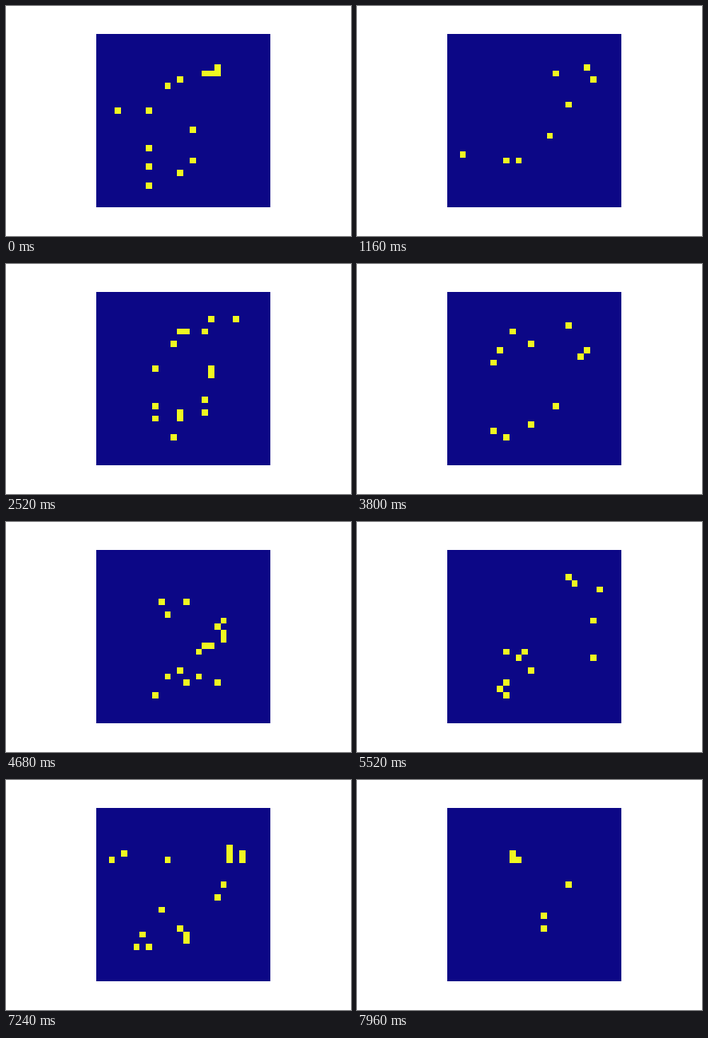
These frames come from a looping animation (432 by 288 pixels, 8000 ms). A matplotlib script:

```python
import numpy as np
import matplotlib.pyplot as plt
from matplotlib.animation import FuncAnimation

SIZE = 28
FRAMES, INTERVAL = 200, 40
STROKE_SPIKES = 11.6   # mean number of active cells on the stroke
STRAYS, STRAY_RATE = 14, .06
MARGIN = 4             # quiet rows above the figure

rng = np.random.default_rng(7)


def smooth(points, rounds=4):
    """Round off a polyline by repeated corner cutting."""
    for _ in range(rounds):
        a, b = points[:-1], points[1:]
        cut = np.stack([.75 * a + .25 * b, .25 * a + .75 * b], axis=1)
        points = np.vstack([points[:1], cut.reshape(-1, 2), points[-1:]])
    return points


def stroke_rates():
    """Firing rates along a handwritten 2 with a looped foot."""
    pen = smooth(np.array([
        (8, 11.5), (12, 7), (22, 3), (22.5, 10.5), (15.5, 16),
        (13, 21), (7, 23), (8, 16), (13, 16.5), (18, 20),
    ]))
    rows, cols = np.mgrid[:SIZE, :SIZE]
    gap = np.hypot(cols[..., None] - pen[:, 0],
                   rows[..., None] - pen[:, 1]).min(axis=-1)
    rates = np.clip(2.2 - gap, 0, 1)
    rates[:MARGIN] = 0
    return rates * STROKE_SPIKES / rates.sum()


def firing_rates():
    """Chance that each cell is active in one time step."""
    rates = stroke_rates()
    rows = rng.integers(MARGIN, SIZE, STRAYS)
    cols = rng.integers(0, SIZE, STRAYS)
    rates[rows, cols] = np.maximum(rates[rows, cols], STRAY_RATE)
    rates[0, SIZE // 4] = STRAY_RATE
    return rates


spikes = rng.random((FRAMES, SIZE, SIZE)) < firing_rates()

fig, ax = plt.subplots(figsize=(6, 4), dpi=72, facecolor="white")
fig.subplots_adjust(left=.125, right=.9, bottom=.125, top=.88)
ax.axis("off")
image = ax.imshow(spikes[0].astype(float), cmap="plasma", vmin=0, vmax=1,
                  interpolation="nearest")


def update(step):
    image.set_data(spikes[step].astype(float))
    return [image]


anim = FuncAnimation(fig, update, frames=FRAMES, interval=INTERVAL,
                     repeat=True, repeat_delay=0)
plt.show()
```
